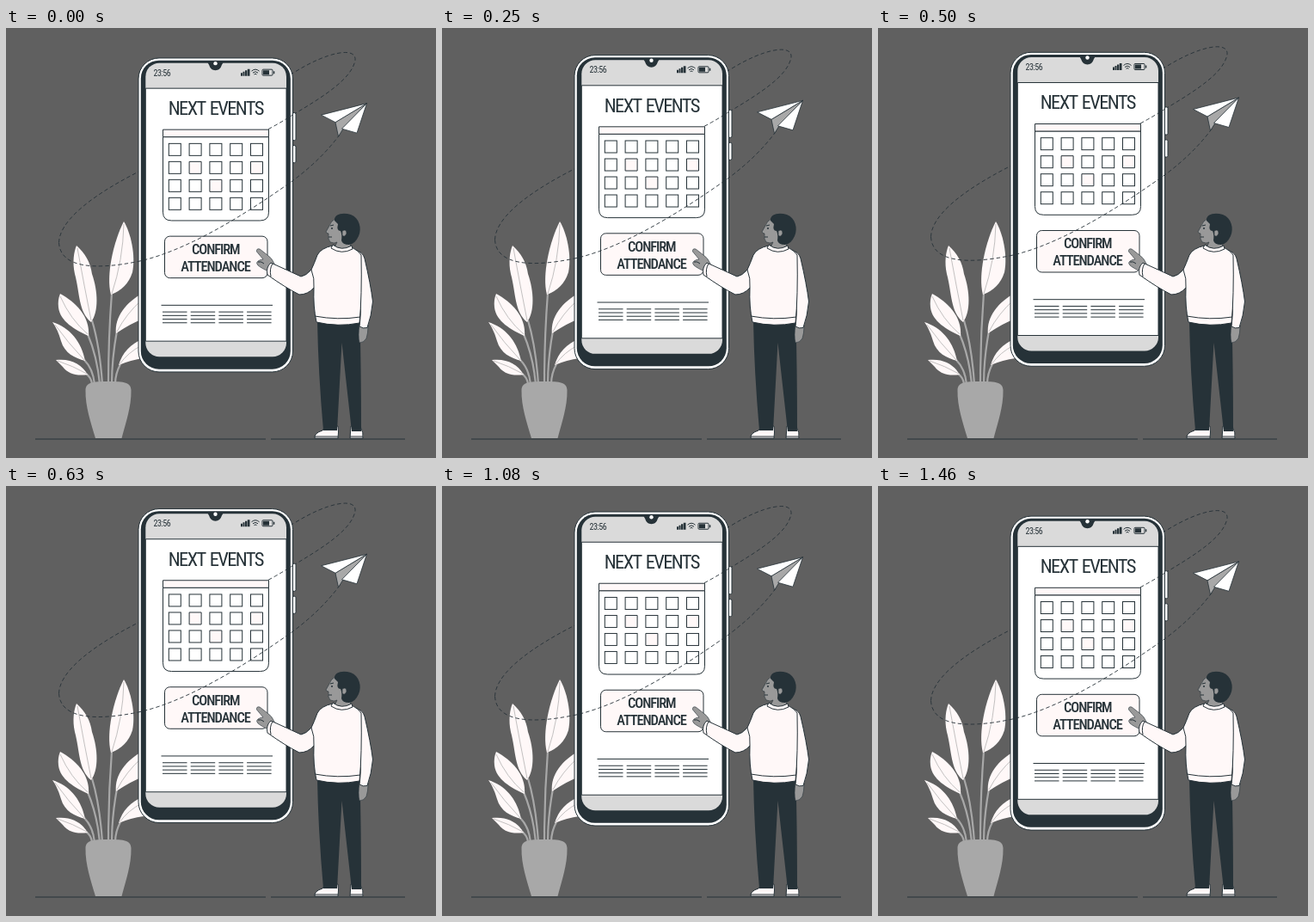
These frames come from a looping animation (500 by 500 pixels, 1.5 s). An HTML page:

```html
<!DOCTYPE html>
<html lang="en">
<head>
<meta charset="utf-8">
<title>Next events</title>
<style>
  html, body { margin: 0; height: 100%; overflow: hidden; background: #606060; }
  svg { display: block; width: 100vw; height: 100vh; }
  .line { fill: none; stroke: #263238; stroke-width: 1; }
  .dash { stroke-dasharray: 4.5 3; stroke-width: .9; }
  .dark { fill: #263238; }
  .white { fill: #fff; stroke: #263238; stroke-width: 1; }
  .pale { fill: #fff8f8; stroke: #263238; stroke-width: 1; stroke-linejoin: round; }
  .skin { fill: #999; stroke: #263238; stroke-width: .6; }
  .leaf { fill: #fff8f8; }
  .stem { fill: none; stroke: #a8a8a8; stroke-width: 2.2; }
  .rib { fill: none; stroke: #a8a8a8; stroke-width: .7; }
  text { font-family: "Roboto Condensed", Roboto, sans-serif; font-stretch: 75%; fill: #263238; text-anchor: middle; }
  .title { font-size: 22.5px; letter-spacing: -1.6px; word-spacing: 2px; }
  .label { font-size: 16.5px; letter-spacing: -1.1px; font-weight: 500; }
  .clock { font-size: 10px; letter-spacing: -.5px; }
</style>
</head>
<body>
<svg viewBox="0 0 500 500">
  <path class="line" d="M34 478H302M308 478H464"/>

  <g id="plant">
    <path class="stem" d="M123 308Q119 360 119 414M100 340Q109 370 112 414M95 356Q106 382 109 414M91 386Q101 396 103 414M93 402Q99 406 100 414M129 352Q123 385 123 414M133 391Q127 402 127 414"/>
    <path class="leaf" d="M122 310C116 288 125 248 137 225C145 238 151 264 147 284Q141 303 122 310Z"/>
    <path class="leaf" d="M99 342C84 330 86 308 80 286C77 272 79 260 82 253C92 262 98 272 100 286C107 306 108 330 99 342Z"/>
    <path class="leaf" d="M96 358C80 351 63 341 61 325Q60 316 63 309C80 318 98 335 96 358Z"/>
    <path class="leaf" d="M92 387C80 384 68 378 64 364Q60 350 54 342C74 348 88 365 92 387Z"/>
    <path class="leaf" d="M95 403C82 405 72 402 66 394L58 386C76 384 88 391 95 403Z"/>
    <path class="leaf" d="M128 355C126 336 140 318 160 308V338Q146 343 128 355Z"/>
    <path class="leaf" d="M131 392C135 378 145 367 160 361V384Q145 386 131 392Z"/>
    <path class="rib" d="M137 228Q136 270 123 309M83 256Q91 300 99 340M63 312Q75 339 95 356M57 345Q72 366 91 386M60 387Q78 393 94 402M158 316Q140 332 129 353M158 369Q142 377 132 391"/>
    <path fill="#a8a8a8" d="M92.500 421C93 412 100 411 119 411S145 412 145.500 421C146 440 139 460 134.500 477H104C99 460 92 440 92.500 421Z"/>
  </g>

  <g id="float">
    <path class="line dash" d="M334 101C371 79 402 59 406 38C408 22 375 27 335 52C275 84 215 136 155 167C90 200 62 228 61.500 250"/>
    <g id="phone">
      <rect class="white" x="331" y="99" width="6" height="32" rx="1.500"/>
      <rect class="white" x="331" y="137" width="6" height="20" rx="1.500"/>
      <rect class="white" x="154" y="35.300" width="179.500" height="365" rx="24"/>
      <rect class="dark" x="156.800" y="38" width="174" height="359" rx="21"/>
      <rect fill="#dadada" x="162.300" y="41" width="163.700" height="341.500" rx="16"/>
      <path class="white" d="M162.300 70.500H326V364.500H162.300Z"/>
      <path class="dark" d="M232 39Q235 40 236 43Q238 49.500 243.500 49.500T251 43Q252 40 255 39Z"/>
      <circle cx="243.500" cy="41.500" r="2.200" fill="#fff"/>
      <text class="clock" x="181.300" y="56">23:56</text>
      <path class="dark" d="M273 56V52.500H275V56ZM275.500 56V51H277.500V56ZM278 56V49.500H280.300V56ZM280.800 56V48H283.500V56Z"/>
      <path class="line" d="M285.500 50.500Q290 46.500 294.500 50.500M287 52.500Q290 49.700 293 52.500M288.500 54.300Q290 53 291.500 54.300"/>
      <rect class="line" x="298" y="48.500" width="12" height="7" rx="1"/>
      <path class="dark" d="M299 49.500H306V54.500H299ZM311 50.500H312.300V53.500H311Z"/>
      <text class="title" x="243.800" y="101.500">NEXT EVENTS</text>
      <path class="white" d="M182.500 127H305.500V214.500Q305.500 224.300 295.500 224.300H192.500Q182.500 224.300 182.500 214.500Z"/>
      <path class="pale" d="M182.500 118.500H305.500V127H182.500Z"/>
      <g id="days"></g>
      <rect class="pale" x="184.500" y="242.500" width="119.500" height="48.500" rx="6"/>
      <text class="label" x="243.800" y="263.500">CONFIRM</text>
      <text class="label" x="243.500" y="283.500">ATTENDANCE</text>
      <path class="line" d="M180.500 322.700H310"/>
      <path class="line" id="notes"/>
    </g>
    <path class="line dash" d="M305 118Q320 110 334 101M61.500 250C63 278 100 283 155 271.500C220 257 298 203 334 177.500Q368 152 389 123"/>
    <g id="plane" stroke="#263238" stroke-width=".8" stroke-linejoin="round">
      <path fill="#a8a8a8" d="M419.500 88L383 110L386.500 126.500L392 117.500Z"/>
      <path fill="#fff" d="M419.500 88L366.500 101.500L383 110ZM419.500 88L390.500 117.500L408 122.500Z"/>
    </g>
  </g>

  <g id="person">
    <path class="pale" d="M359 477Q358 471 368 468L371 463H386Q387 470 386 477ZM400 477L401 463H412Q416 471 415 477Z"/>
    <path class="line" d="M359 475H386M400 475H415"/>
    <path class="dark" d="M362 341H411.500Q413 400 413 469H402L390.500 366L385 468H369Q363 400 362 341Z"/>
    <path class="skin" d="M411 345Q409 358 411 366Q416 366 419 361Q421 355 421 346Z"/>
    <path class="skin" d="M314 285C306 284 298 280 293 276Q290 273 293 271Q296 269 299 269L291.500 260Q291 256 295 257L304 264Q309 267 312 274Z"/>
    <path class="line" stroke-width=".6" d="M293 272Q297 271 300 274"/>
    <path class="pale" d="M405 258Q415 260 417 268Q424 298 426.500 318Q425 335 420 348.500Q415 350 411 347Q413 330 412 318Z"/>
    <path class="pale" d="M380 253Q366 256 362 264Q358 275 355 281Q349 288 343 289Q328 282 308 273Q302 278 304 287Q325 302 341 310Q351 310 358 302Q357 324 361 342Q386 348 411 343Q414 312 413 264Q410 259 400 254Z"/>
    <path class="line" d="M359 335Q386 340 412 336M355 281Q359 291 358 302M310 274Q306 280 308 289"/>
    <path class="skin" d="M384 221Q377 225 376 230L372 237Q373 239 375 239Q374 246 377 249Q382 251 385 249L382 255Q390 261 400 257L402 240Z"/>
    <path class="dark" d="M382 224C381 216 392 214 401 217C411 221 414 233 410 242Q406 251 399 252Q391 252 390 247Q391 240 389 236Q384 236 386 228Z"/>
    <path class="skin" d="M391 236Q396 233 396 239Q394 244 391 241Z"/>
    <path class="line" d="M377 230L381 229M375 243L379 243"/>
    <circle class="dark" cx="379" cy="233" r="1"/>
    <path class="pale" d="M380 252Q390 260 402 253L403 257Q390 264 378 256Z"/>
  </g>
</svg>
<script>
const LOOP = 1500, RISE = 10, LEAD = 25;
const byId = id => document.getElementById(id);
const marked = ['1,1', '4,1', '2,2'];

let days = '', notes = '';
for (let row = 0; row < 4; row++) {
  for (let col = 0; col < 5; col++) {
    const style = marked.includes(`${col},${row}`) ? 'pale' : 'white';
    days += `<rect class="${style}" x="${189.3 + col * 23.8}" y="${134.7 + row * 21}" width="14" height="14"/>`;
  }
  for (let col = 0; col < 4; col++) notes += `M${182 + col * 32.7} ${330.5 + row * 4.2}h28.500`;
}
byId('days').innerHTML = days;
byId('notes').setAttribute('d', notes);

function draw() {
  const phase = (performance.now() + LEAD) % LOOP / LOOP;
  const y = -RISE * (1 - Math.abs(2 * phase - 1));
  byId('float').setAttribute('transform', `translate(0 ${y})`);
  requestAnimationFrame(draw);
}
draw();
</script>
</body>
</html>
```
